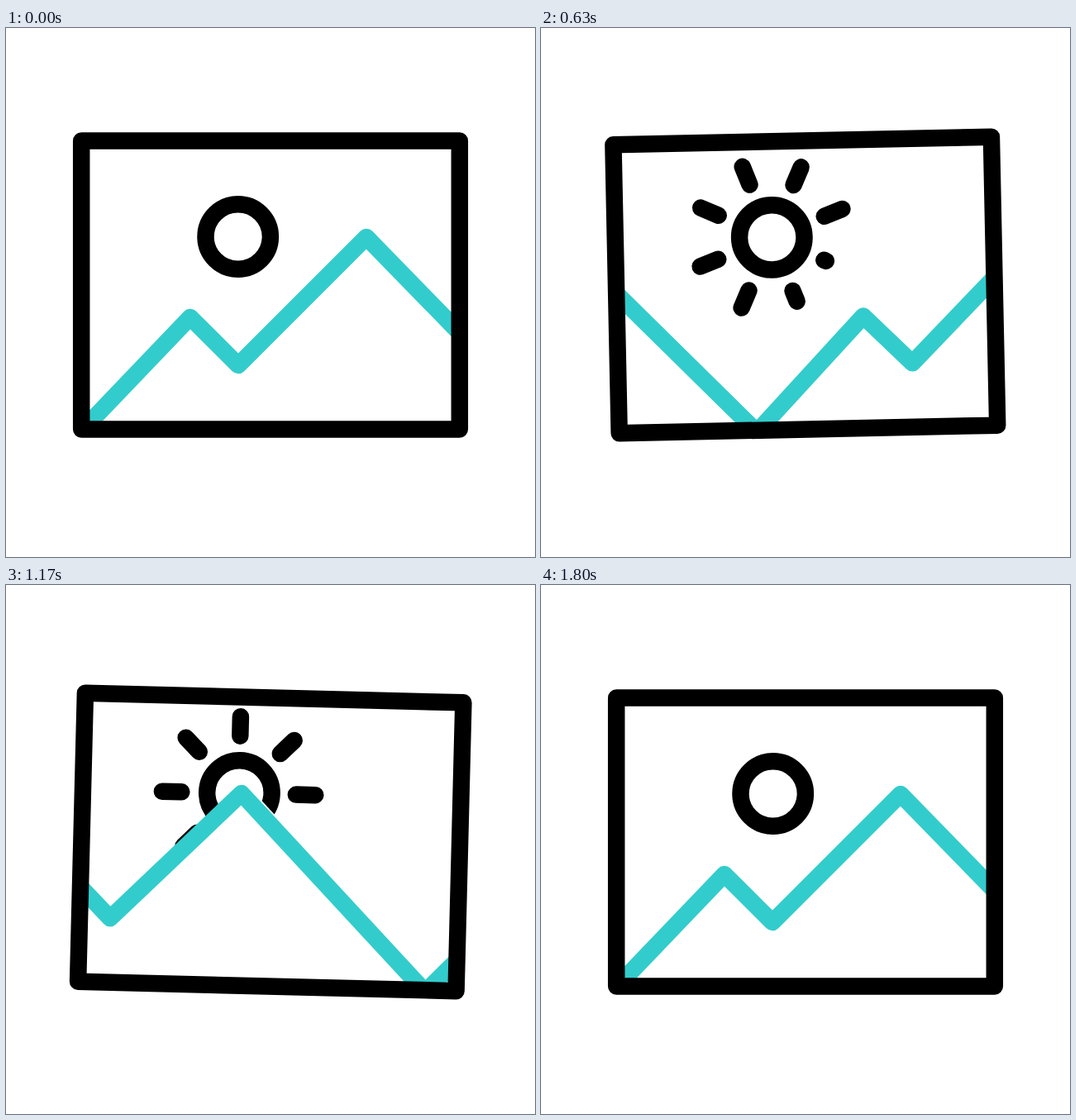
These frames come from a looping animation (640x640 px, 2 s). An HTML page:

```html
<!DOCTYPE html>
<html lang="en">
<head>
<meta charset="utf-8">
<title>Picture icon</title>
<style>
  html, body { margin: 0; width: 100%; height: 100%; overflow: hidden; background: #fff; }
  svg { display: block; width: 100%; height: 100%; }
  path, rect, circle, line { fill: none; stroke-width: 20.5; stroke-linecap: round; stroke-linejoin: round; }
  .ink { stroke: #000; }
  .land { fill: #fff; }
  .gap { stroke: #fff; stroke-width: 24; }
  .ridge { stroke: #3cc; }
</style>
</head>
<body>
<svg viewBox="0 0 640 640">
  <defs>
    <clipPath id="inside"><rect x="91" y="136.5" width="458" height="349"/></clipPath>
  </defs>
  <g id="card">
    <circle class="ink" cx="280.7" cy="252.5" r="39.2"/>
    <g id="rays"></g>
    <g clip-path="url(#inside)"><g id="hills"></g></g>
    <rect class="ink" x="91.2" y="136.5" width="457.6" height="349"/>
  </g>
</svg>
<script>
const LOOP = 2000, PERIOD = 573.2, TRAVEL = 572.2;
const RAYS = 8, INNER = 69.3, LENGTH = 23.4;

const card = document.getElementById('card');
const rays = document.getElementById('rays');
const hills = document.getElementById('hills');

function add(parent, tag, attrs) {
  const el = document.createElementNS('http://www.w3.org/2000/svg', tag);
  for (const name in attrs) el.setAttribute(name, attrs[name]);
  return parent.appendChild(el);
}

// Smooth progress from 0 to 1 between two times
function ease(t, from, to) {
  const x = Math.min(1, Math.max(0, (t - from) / (to - from)));
  return x * x * (3 - 2 * x);
}

// Each step is [time, value], eased from one to the next
function track(t, steps) {
  let value = steps[0][1];
  for (let i = 1; i < steps.length; i++) {
    value += (steps[i][1] - steps[i - 1][1]) * ease(t, steps[i - 1][0], steps[i][0]);
  }
  return value;
}

const TILT = [[10, 0], [448, -17.8], [696, 1.95], [1067, 1.95], [1367, 0]];
const SPIN = [[35, 90], [905, 0], [1160, 0], [1685, 90]];

// Two copies of the ridge, one period apart
const ridge = [-PERIOD, 0].flatMap(dx =>
  [[91.2, 487.5], [222.8, 350], [281, 408], [436, 253]].map(([x, y]) => [x + dx, y]));
ridge.push([91.2 + PERIOD, 487.5]);
const outline = 'M' + ridge.map(p => p.join()).join('L');

add(hills, 'path', { class: 'land', d: outline + 'V520H' + ridge[0][0] + 'Z' });
for (const i of [3, 7]) {
  add(hills, 'path', { class: 'gap', d: 'M' + ridge[i].join() + 'L' + ridge[i + 1].join() });
}
add(hills, 'path', { class: 'ridge', d: outline });

const beams = Array.from({ length: RAYS }, (_, i) => add(rays, 'line', {
  class: 'ink', x1: INNER, x2: INNER, y1: 0, y2: 0, transform: `rotate(${-i * 360 / RAYS})`
}));

function draw(t) {
  card.setAttribute('transform', `rotate(${track(t, TILT)} 320 320)`);
  hills.setAttribute('transform', `translate(${TRAVEL * ease(t, 10, 1757)} 0)`);
  rays.setAttribute('transform', `translate(279.9 252.9) rotate(${-track(t, SPIN)})`);
  beams.forEach((beam, i) => {
    const born = 244 + 51 * i, gone = 1188 + 45 * i;
    const size = ease(t, born, born + 150) - ease(t, gone, gone + 167);
    beam.setAttribute('x2', INNER + LENGTH * size);
    beam.style.display = size > 0.001 ? '' : 'none';
  });
}

// Thirty pictures a second, then a pause at the end
function step(ms) {
  const rest = ms % 100;
  const part = rest < 30 ? 0 : rest < 70 ? 1 : 2;
  return Math.min(1800, (3 * Math.floor(ms / 100) + part) * 100 / 3);
}

const start = performance.now();
function tick() {
  draw(step((performance.now() - start) % LOOP));
  requestAnimationFrame(tick);
}
tick();
</script>
</body>
</html>
```
